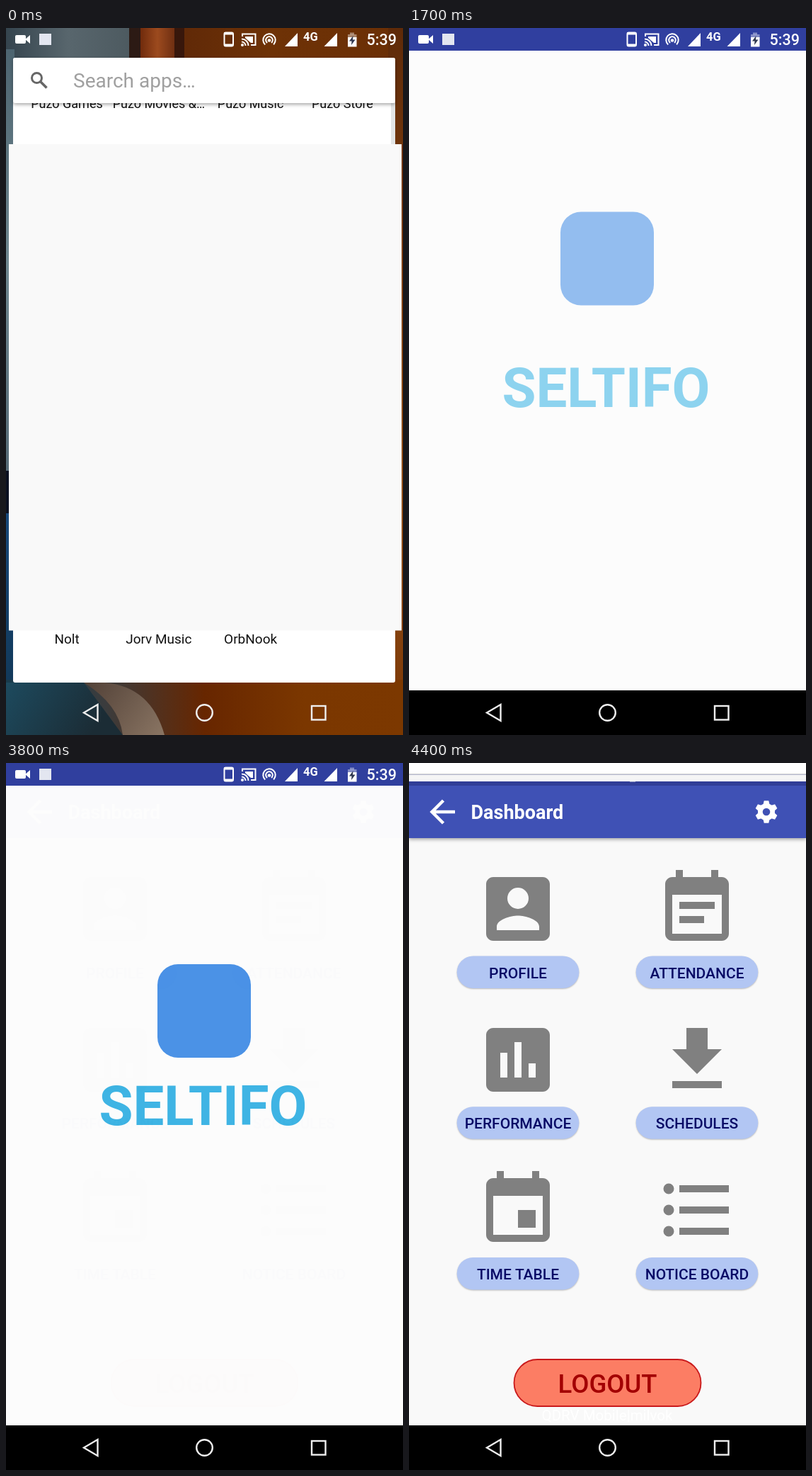
Write an HTML page with a canvas that moves like this. It is 561 px wide and 998 px high and loops after 4500 ms.

```html
<!DOCTYPE html>
<html lang="en">
<head>
<meta charset="utf-8">
<title>App launch</title>
<style>
html, body { margin: 0; width: 100%; height: 100%; overflow: hidden; background: #000; }
canvas { display: block; width: 561px; height: 998px; }
</style>
</head>
<body>
<canvas id="stage" width="561" height="998"></canvas>
<script>
const W = 561, H = 998, LOOP = 4500, STEP = 100;
const BAR = 32, NAV = 935;
const stage = document.getElementById('stage').getContext('2d');
let c = stage;

const clamp = v => Math.max(0, Math.min(1, v));
const mix = (a, b, p) => a + (b - a) * p;

function box(x, y, w, h, fill) {
  c.fillStyle = fill;
  c.fillRect(x, y, w, h);
}

function round(x, y, w, h, r, fill) {
  c.beginPath();
  c.roundRect(x, y, w, h, r);
  c.fillStyle = fill;
  c.fill();
}

function poly(points, fill) {
  c.beginPath();
  points.forEach(([x, y]) => c.lineTo(x, y));
  c.closePath();
  if (fill) { c.fillStyle = fill; c.fill(); }
}

function disc(x, y, r, fill) {
  c.beginPath();
  c.arc(x, y, r, 0, Math.PI * 2);
  c.fillStyle = fill;
  c.fill();
}

function arc(x, y, r, from, to) {
  c.beginPath();
  c.arc(x, y, r, from, to);
  c.stroke();
}

function label(str, x, y, size, weight, fill, align = 'center') {
  c.font = `${weight} ${size}px Roboto, sans-serif`;
  c.textAlign = align;
  c.fillStyle = fill;
  c.fillText(str, x, y);
}

function pen(color, width) {
  c.strokeStyle = color;
  c.lineWidth = width;
}

function shadow(color, blur, dy) {
  c.shadowColor = color;
  c.shadowBlur = blur;
  c.shadowOffsetY = dy;
}
const noShadow = () => shadow('transparent', 0, 0);

function ramp(x0, y0, x1, y1, ...colors) {
  const g = c.createLinearGradient(x0, y0, x1, y1);
  colors.forEach((col, i) => g.addColorStop(i / (colors.length - 1), col));
  return g;
}

// ---- home screen ----
function wallpaper() {
  box(0, 0, W, H, ramp(190, 0, W, 0, '#5a2508', '#6e3206', '#6b2f05'));
  box(540, 0, 21, H, ramp(0, 0, 0, H, '#5f2a08', '#7d3f10', '#91501c', '#7a3604'));
  box(0, 0, 176, 60, ramp(0, 0, 176, 0, '#35444e', '#58666d', '#4d5a60'));
  box(174, 0, 16, 60, '#2c1a14');
  box(190, 0, 48, 60, ramp(190, 0, 238, 0, '#702b0c', '#9c4a1e', '#6f2f12'));
  box(238, 0, 14, 60, '#38170b');
  box(0, 30, 12, 600, ramp(0, 30, 0, 630, '#4d6470', '#6f8790', '#566a76'));
  box(0, 625, 12, 60, '#0b1020');
  box(0, 685, 12, 240, ramp(0, 685, 0, 925, '#17487a', '#12395a'));
  box(0, 920, W, 78, ramp(0, 0, W, 0, '#183b4c', '#3b3c3d', '#672600', '#7b3700', '#7c3800'));
  poly([[0, 924], [110, 924], [165, H], [0, H]], ramp(0, 924, 120, H, '#1d4a5e', '#1b2c35'));
  c.beginPath();
  c.moveTo(140, 924);
  c.quadraticCurveTo(205, 930, 224, H);
  c.lineTo(165, H);
  c.quadraticCurveTo(160, 955, 110, 924);
  c.fillStyle = ramp(120, 924, 224, H, '#544339', '#8a7563');
  c.fill();
}

function drawer() {
  round(10, 42, 540, 882, 3, '#fff');
  ['Puzo Games', 'Puzo Movies &…', 'Puzo Music', 'Puzo Store']
    .forEach((s, i) => label(s, 86 + i * 129.8, 113, 18, 400, '#111'));
  ['Nolt', 'Jorv Music', 'OrbNook']
    .forEach((s, i) => label(s, 86 + i * 129.8, 869, 19, 400, '#111'));
  box(544, 106, 6, 60, '#e3e5e6');
  shadow('rgba(0,0,0,.35)', 5, 2);
  round(10, 42, 540, 64, 3, '#fff');
  noShadow();
  pen('#666', 3);
  arc(43.5, 70.5, 7, 0, 7);
  c.lineWidth = 3.6;
  c.beginPath();
  c.moveTo(48.5, 75.5);
  c.lineTo(57.5, 84.5);
  c.stroke();
  label('Search apps…', 95, 84, 28, 400, '#a0a0a0', 'left');
}

// ---- system bars ----
function statusIcons() {
  const w = '#fff';
  round(13, 10, 15, 12, 2, w);
  poly([[27, 16], [34, 10], [34, 22]], w);
  box(47, 8, 17, 16, '#e3e6f0');

  pen(w, 2);
  c.beginPath();
  c.roundRect(308.5, 6.5, 12.5, 19, 2);
  c.stroke();
  box(308, 6, 13, 3.5, w);
  box(308, 22.5, 13, 3.5, w);

  c.beginPath();
  [[334, 12], [334, 8.5], [352.5, 8.5], [352.5, 24], [346, 24]].forEach(p => c.lineTo(...p));
  c.stroke();
  poly([[338, 12], [349, 12], [349, 21], [346, 21], [338, 14]], w);
  arc(333, 25, 9.5, -Math.PI / 2, 0);
  arc(333, 25, 5.5, -Math.PI / 2, 0);
  disc(334, 24, 2, w);

  arc(372, 17, 8.7, 2.3, 7.1);
  arc(372, 17, 4.8, 2.2, 7.2);
  disc(372, 17.5, 2.3, w);

  poly([[394, 26], [412, 26], [412, 7]], w);
  label('4G', 420, 17.5, 16.5, 700, w, 'left');
  poly([[449.5, 26], [468, 26], [468, 7]], w);

  box(486, 6.5, 6, 3, 'rgba(255,255,255,.4)');
  box(483, 9, 12.5, 6, 'rgba(255,255,255,.4)');
  box(483, 13, 12.5, 13.5, w);
  poly([[490.5, 11], [485, 18.5], [488.5, 18.5], [488, 24], [493.5, 16.5], [490, 16.5]], '#303850');
  label('5:39', 509.5, 24, 21.5, 500, w, 'left');
}

function navIcons() {
  pen('#eee', 2.4);
  poly([[110, 966.5], [129.5, 955], [129.5, 978]]);
  c.stroke();
  arc(280.5, 966.5, 11.3, 0, 7);
  c.strokeRect(432, 957, 19.5, 19.5);
}

// ---- splash ----
function splash(t) {
  const alpha = Math.sin(Math.PI / 2 * clamp((t - 40) / 3000)) ** 2;
  const slide = 381 * (1 - clamp((t - 40) / 2000)) ** 1.55;
  box(0, 0, W, BAR, '#303f9f');
  box(0, BAR, W, NAV - BAR, '#f9f9f9');
  c.save();
  c.globalAlpha *= alpha;
  box(0, BAR, W, NAV - BAR, '#fff');
  c.beginPath();
  c.rect(0, BAR, W, NAV - BAR);
  c.clip();
  round(214, 284 - slide, 132, 132, 29, '#4a92e8');
  label('SELTIFO', 278.5, 511 + slide, 78, 700, '#3db5e6');
  c.restore();
  box(0, NAV, W, H - NAV, '#000');
}

// ---- dashboard ----
const bullet = y => `M2.5 ${y}a1.5 1.5 0 1 0 3 0a1.5 1.5 0 1 0-3 0zM7 ${y - 1}h14v2H7z`;
const frame = 'M6 1h2v2h8V1h2v2h1c1.1 0 2 .9 2 2v14c0 1.1-.9 2-2 2H5c-1.1 0-2-.9-2-2V5c0-1.1.9-2 2-2h1zM5 8v11h14V8z';
const card = 'M5 3h14c1.1 0 2 .9 2 2v14c0 1.1-.9 2-2 2H5c-1.1 0-2-.9-2-2V5c0-1.1.9-2 2-2z';
const tiles = [
  ['PROFILE', 146, card + 'M9 9a3 3 0 1 0 6 0a3 3 0 1 0-6 0zM6 17c0-2 4-3.1 6-3.1s6 1.1 6 3.1v1H6z'],
  ['ATTENDANCE', 146, frame + 'M7 10h10v2H7zM7 14h7v2H7z'],
  ['PERFORMANCE', 359, card + 'M7 10h2v7H7zM11 7h2v10h-2zM15 13h2v4h-2z'],
  ['SCHEDULES', 359, 'M19 9h-4V3H9v6H5l7 7zM5 18h14v2H5z'],
  ['TIME TABLE', 571, frame + 'M12 12h5v5h-5z'],
  ['NOTICE BOARD', 571, [6, 12, 18].map(bullet).join('')]
].map(([name, y, d]) => ({ name, y, path: new Path2D(d) }));

function gear(x, y) {
  c.save();
  c.translate(x, y);
  disc(0, 0, 12, '#fff');
  for (let i = 0; i < 6; i++) {
    poly([[-4.8, -9], [-3.3, -15.8], [3.3, -15.8], [4.8, -9]], '#fff');
    c.rotate(Math.PI / 3);
  }
  disc(0, 0, 5.3, '#3f51b5');
  c.restore();
}

function dashboard() {
  box(0, 0, W, NAV, '#f9f9f9');
  shadow('rgba(0,0,0,.35)', 5, 2);
  box(0, BAR, W, 74, '#3f51b5');
  noShadow();
  box(0, 0, W, BAR, '#303f9f');
  pen('#fff', 4.5);
  c.beginPath();
  [[48.5, 53], [32.5, 69], [48.5, 85]].forEach(p => c.lineTo(...p));
  c.moveTo(33, 69);
  c.lineTo(65, 69);
  c.stroke();
  label('Dashboard', 87.5, 79, 27, 700, '#fff', 'left');
  gear(505, 69);

  tiles.forEach(({ name, y, path }, i) => {
    const x = i % 2 ? 347 : 94;
    c.save();
    c.translate(x, y);
    c.scale(5, 5);
    c.fillStyle = '#808080';
    c.fill(path, 'evenodd');
    c.restore();
    const top = 272.5 + (i >> 1) * 212.7;
    shadow('rgba(0,0,0,.25)', 2, 1);
    round(x - 26.3, top, 172.6, 45.5, 22.75, '#b2c6f3');
    noShadow();
    label(name, x + 60, top + 31, 21, 500, '#080a66');
  });

  round(148.5, 842, 264, 66, 33, '#fc7d64');
  pen('#c9191b', 1.8);
  c.stroke();
  label('LOGOUT', 280.5, 889, 36.5, 500, '#a30003');
}

// Top edge of the notification panel
function shade() {
  box(0, 0, W, 15, '#fff');
  box(0, 15, W, 1.5, '#cfcfcf');
  box(0, 16.5, W, 9.5, '#f5f5f5');
  box(0, 26, W, 6, '#313e97');
  box(312, 26, 8, 1, '#8c94c4');
  label('QDRV Mobile|milvok', 280, 928, 20.5, 400, '#fff');
}

const layer = document.createElement('canvas');
layer.width = W;
layer.height = H;
c = layer.getContext('2d');
dashboard();
c = stage;

function draw(t) {
  if (t < 300) {
    wallpaper();
    drawer();
  }
  const open = 1 - (1 - clamp(t / 300)) ** 3;
  const x = mix(4, 0, open), y = mix(164, 0, open);
  c.save();
  c.beginPath();
  c.rect(x, y, mix(559, W, open) - x, mix(850.5, H, open) - y);
  c.clip();
  splash(t);
  c.restore();

  const fade = clamp((t - 3760) / 500) ** 2;
  if (fade > 0) {
    c.globalAlpha = fade;
    box(0, 0, W, NAV, '#000');
    c.drawImage(layer, 0, 0);
    c.globalAlpha = 1;
  }
  if (t >= 4400) shade();
  else statusIcons();
  navIcons();
}

const start = performance.now();
function tick() {
  const t = (performance.now() - start) % LOOP;
  draw(Math.floor(t / STEP) * STEP);
  requestAnimationFrame(tick);
}
tick();
</script>
</body>
</html>
```
